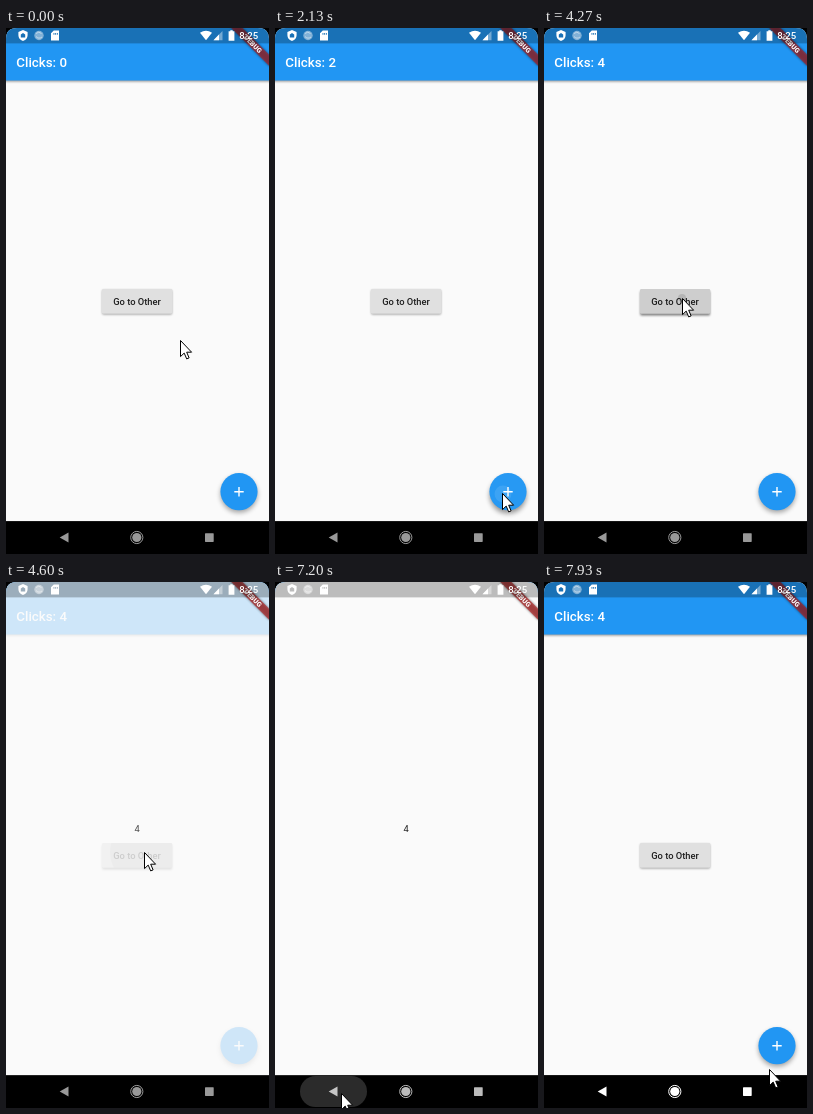
Animation of 263x526 px, one loop 8 s. Source, as an HTML page:

```html
<!DOCTYPE html>
<html lang="en">
<head>
<meta charset="utf-8">
<title>Click counter</title>
<style>
  html, body { margin: 0; width: 100%; height: 100%; overflow: hidden; background: #000; }
  svg { display: block; width: 100%; height: 100%; }
  text { font-family: Roboto, "Open Sans", sans-serif; }
  .medium { font-weight: 500; }
</style>
</head>
<body>
<svg viewBox="0 0 263 526" xmlns="http://www.w3.org/2000/svg">
  <defs>
    <clipPath id="screen"><path d="M0 494V11Q0 0 11 0H252Q263 0 263 11V494Z"/></clipPath>
    <clipPath id="fabClip"><circle cx="233" cy="463.7" r="18.6"/></clipPath>
    <clipPath id="buttonClip"><rect x="96" y="261" width="70.3" height="24.7" rx="1.4"/></clipPath>
    <filter id="soft" x="-30%" y="-60%" width="160%" height="220%"><feGaussianBlur stdDeviation="1.2"/></filter>
    <filter id="softer" x="-40%" y="-40%" width="180%" height="180%"><feGaussianBlur stdDeviation="2.4"/></filter>
  </defs>

  <g clip-path="url(#screen)">
    <rect width="263" height="493.3" fill="#fafafa"/>

    <!-- counter page -->
    <rect x="-4" y="10" width="271" height="43.6" fill="#000" opacity=".4" filter="url(#soft)"/>
    <rect width="263" height="52.5" fill="#2196f3"/>
    <text id="title" class="medium" x="10.3" y="39" font-size="13.3" fill="#fff"></text>

    <rect id="buttonShade" x="96.3" y="262" width="69.7" height="24.6" rx="1.4" filter="url(#soft)"/>
    <rect id="button" x="96" y="261" width="70.3" height="24.7" rx="1.4"/>
    <g clip-path="url(#buttonClip)"><circle id="buttonSplash" cx="138" cy="270" fill="#000"/></g>
    <text class="medium" x="131" y="276.6" font-size="9.33" text-anchor="middle" fill-opacity=".87">Go to Other</text>

    <circle id="fabShade" cx="233" r="18.4" filter="url(#softer)"/>
    <circle cx="233" cy="463.7" r="18.6" fill="#2196f3"/>
    <g id="ripples" clip-path="url(#fabClip)" fill="#fff"></g>
    <path d="M228.3 463.7h9.4M233 459v9.4" stroke="#fff" stroke-width="1.4"/>

    <!-- other page -->
    <g id="other">
      <rect width="263" height="493.3" fill="#fafafa"/>
      <text x="131" y="249.8" font-size="9.33" text-anchor="middle" fill-opacity=".87">4</text>
    </g>

    <g transform="translate(263 0) rotate(45)">
      <rect x="-27" y="18.7" width="54" height="8" opacity=".5" filter="url(#soft)"/>
      <rect x="-27" y="18.7" width="54" height="8" fill="#b71c1c" fill-opacity=".63"/>
      <text y="25.1" font-size="6.8" font-weight="900" text-anchor="middle" fill="#fff">DEBUG</text>
    </g>

    <!-- status bar -->
    <rect width="263" height="15.4" fill-opacity=".25"/>
    <g fill="#fff">
      <path fill-rule="evenodd" d="M17 2l4.6 2v3.3q0 4-4.6 5.6q-4.6-1.600-4.6-5.600V4zM17 5l-2.200 1.600v2.800h4.400V6.600z"/>
      <circle cx="33" cy="7.500" r="4.700" opacity=".45"/>
      <path d="M30 5.500a4 4 0 0 1 5.500 0M30 8.500a4 4 0 0 0 6 .5" fill="none" stroke="#fff" stroke-width=".9" opacity=".55"/>
      <path fill-rule="evenodd" d="M47.800 2.500H53V12.500H45V5.300zM47.500 5v1.800h.9V5zm1.700 0v1.800h.9V5zm1.700 0v1.800h.9V5z"/>
      <path d="M194 4.700Q200 .7 206 4.700L200 12.300Z"/>
      <path d="M207.500 12.300L216.500 3V12.300Z" opacity=".4"/>
      <path d="M207.500 12.300L213 6.600V12.300Z"/>
      <path d="M222.600 3.300h1.700V2.200h2.400v1.100h1.700v9.400h-5.800z"/>
      <text class="medium" x="233.300" y="10.900" font-size="9.600">8:25</text>
    </g>
  </g>

  <!-- navigation bar -->
  <rect y="493.300" width="263" height="32.700"/>
  <rect id="navPress" x="25" y="494" width="67" height="31" rx="15.500" fill="#2b2b2b"/>
  <g id="nav" fill="#fff">
    <path d="M53.700 509.500L62.500 504.400V514.600Z"/>
    <circle cx="130.800" cy="509.500" r="6.100" fill="none" stroke="#fff" stroke-width="1"/>
    <circle cx="130.800" cy="509.500" r="4.600"/>
    <rect x="199" y="505.200" width="8.700" height="8.700" rx=".6"/>
  </g>

  <path id="cursor" d="M.5 .5V16.600L4.200 13.100L6.700 18.900L9.100 17.900L6.700 12.200H11.600Z"
        fill="#fff" stroke="#000" stroke-width="1" stroke-linejoin="round"/>
</svg>

<script>
const LOOP = 8000, STEP = 1000 / 15;
const $ = id => document.getElementById(id);
const clamp = v => Math.max(0, Math.min(1, v));
const ramp = (t, from, to) => clamp((t - from) / (to - from));
const mix = (a, b, k) => a + (b - a) * k;

// Pointer tip: time, x, y
const route = [
  [0, 174, 312], [67, 173, 324], [200, 228, 384], [267, 234, 365], [467, 234, 365],
  [733, 223, 458], [867, 226, 465], [1000, 226, 465], [1067, 227, 465], [2933, 227, 465],
  [3333, 139, 267], [3667, 139, 267], [3733, 138, 270], [4867, 138, 270],
  [5067, 163, 245], [5267, 135, 206], [5467, 72, 240], [5600, 90, 282], [5733, 123, 269],
  [5867, 142, 240], [6000, 120, 215], [6200, 83, 290], [6600, 81, 516], [6800, 66, 511],
  [7467, 66, 511], [7533, 68, 511], [7933, 225, 487]
];
const presses = [1733, 2067, 2600, 2867];

// Smooth curve through the route that never overshoots a point
function slope(i, axis) {
  const a = route[i - 1], b = route[i], c = route[i + 1];
  if (!a || !c) return 0;
  const before = (b[axis] - a[axis]) / (b[0] - a[0]);
  const after = (c[axis] - b[axis]) / (c[0] - b[0]);
  return before * after > 0 ? 2 * before * after / (before + after) : 0;
}

function along(t, axis) {
  const last = route.length - 1;
  if (t >= route[last][0]) return route[last][axis];
  const i = route.findIndex(p => p[0] > t) - 1;
  const a = route[i], b = route[i + 1], span = b[0] - a[0], k = (t - a[0]) / span;
  const ease = k * k * (3 - 2 * k);
  return mix(a[axis], b[axis], ease)
    + span * k * (1 - k) * ((1 - k) * slope(i, axis) - k * slope(i + 1, axis));
}

function set(id, attrs) {
  const node = typeof id === "string" ? $(id) : id;
  for (const name in attrs) node.setAttribute(name, attrs[name]);
}

const ripples = presses.map(() => {
  const c = document.createElementNS("http://www.w3.org/2000/svg", "circle");
  set(c, { cx: 228, cy: 466 });
  return $("ripples").appendChild(c);
});

function draw(t) {
  const clicks = presses.filter(p => t >= p + 60).length;
  $("title").textContent = "Clicks: " + clicks;

  let lift = 0;
  presses.forEach((p, i) => {
    const age = t - p;
    const alive = age >= 0 && age < 460;
    const glow = alive ? ramp(age, -60, 120) * (1 - ramp(age, 170, 460)) : 0;
    set(ripples[i], { r: mix(3, 30, ramp(age, 0, 330)), opacity: .14 * glow });
    lift = Math.max(lift, glow);
  });
  set("fabShade", { cy: mix(466.2, 467.6, lift), opacity: mix(.36, .42, lift) });

  const down = t < 4900 ? ramp(t, 4067, 4267) : 0;
  const shade = Math.round(mix(224, 206, down));
  set("button", { fill: `rgb(${shade},${shade},${shade})` });
  set("buttonShade", { y: mix(262, 263, down), opacity: mix(.38, .5, down) });
  set("buttonSplash", { r: mix(4, 40, ramp(t, 4267, 4667)), opacity: down > .9 ? .12 : 0 });

  set("other", { opacity: ramp(t, 4333, 4667) * (1 - ramp(t, 7400, 7667)) });

  set("navPress", { opacity: t >= 7190 ? 1 - ramp(t, 7267, 7500) : 0 });
  set("nav", { opacity: mix(.6, 1, ramp(t, 7133, 7333)) });

  set("cursor", { transform: `translate(${Math.round(along(t, 1))} ${Math.round(along(t, 2))})` });
}

const start = performance.now();
function tick() {
  const t = (performance.now() - start) % LOOP;
  draw(Math.floor((t + 4) / STEP) * STEP % LOOP);
  requestAnimationFrame(tick);
}
draw(0);
requestAnimationFrame(tick);
</script>
</body>
</html>
```
